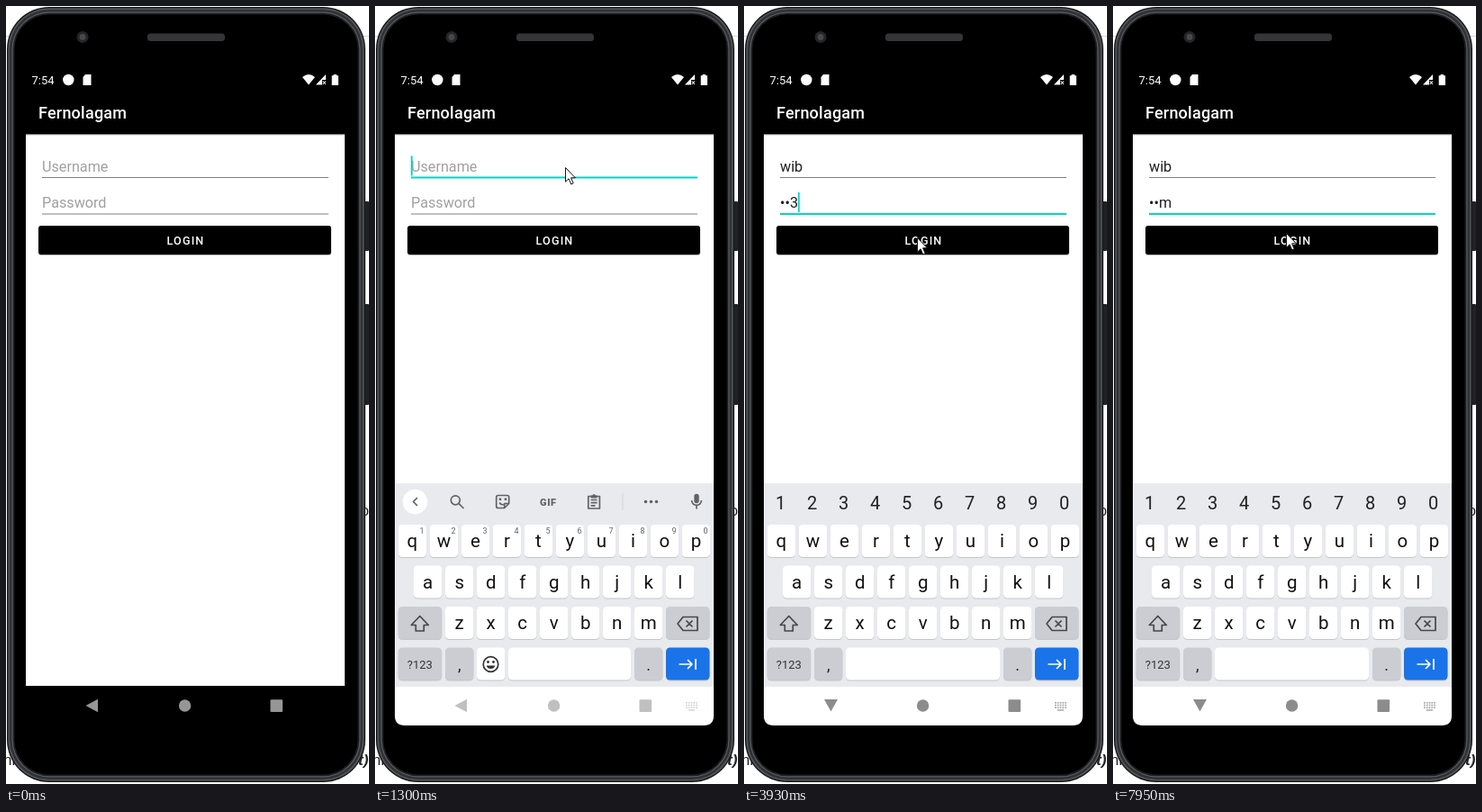
An HTML page for the animation above (8000 ms loop, 403 by 864 pixels).

```html
<!DOCTYPE html>
<html lang="en">
<head>
<meta charset="utf-8">
<title>Login screen</title>
<style>
html, body { margin: 0; width: 100%; height: 100%; overflow: hidden; background: #fff; }
svg { display: block; width: 100%; height: 100%; font-family: Roboto, sans-serif; }
.mid { text-anchor: middle; }
.field { font-size: 16.2px; white-space: pre; }
.line { fill: none; stroke: currentColor; stroke-width: 1.7; stroke-linejoin: round; }
.solid { fill: currentColor; }
</style>
</head>
<body>
<svg id="stage" viewBox="0 0 403 864"></svg>
<script>
const LOOP = 8000;
const TEAL = '#03d6c1';

const rect = (x, y, w, h, fill, r = 0, extra = '') =>
  `<rect x="${x}" y="${y}" width="${w}" height="${h}" rx="${r}" fill="${fill}" ${extra}/>`;
const circle = (x, y, r, fill, extra = '') =>
  `<circle cx="${x}" cy="${y}" r="${r}" fill="${fill}" ${extra}/>`;
const text = (x, y, size, str, fill = '#111', extra = '') =>
  `<text x="${x}" y="${y}" font-size="${size}" fill="${fill}" ${extra}>${str}</text>`;
const at = (x, y, body, color = '#5f6368') =>
  `<g transform="translate(${x} ${y})" color="${color}">${body}</g>`;
const line = d => `<path class="line" d="${d}"/>`;
const solid = d => `<path class="solid" d="${d}"/>`;

// Icons, drawn around 0,0
const icon = {
  search: line('M2.3 2.3L7.5 7.5M3.3 -1.7A5 5 0 1 1 -6.7 -1.7A5 5 0 1 1 3.3 -1.7Z'),
  sticker: line('M-5 -7H5Q7 -7 7 -5V2L2 7H-5Q-7 7 -7 5V-5Q-7 -7 -5 -7ZM2 7V2H7M-3.5 1Q-2 4 1 3') +
    solid('M-4 -4H-1.5V-1.5H-4ZM2 -4H4.5V-1.5H2Z'),
  gif: text(0, 4, 11, 'GIF', 'currentColor', 'class="mid" font-weight="900" letter-spacing=".6"'),
  clipboard: line('M-6.3 -6H6.3V7.5H-6.3ZM-3.5 -2H3.5M-3.5 1.2H3.5M-3.5 4.4H1.5') +
    solid('M-3.5 -7H-1.8A1.9 1.9 0 0 1 1.8 -7H3.5V-4H-3.5Z'),
  gear: circle(0, 0, 4.3, 'none', 'stroke="currentColor" stroke-width="4"') +
    circle(0, 0, 7, 'none', 'stroke="currentColor" stroke-width="2.4" stroke-dasharray="3.67 3.66"'),
  palette: solid('M0 -7.5A7.5 7.5 0 1 0 0 7.5Q2 7 1.3 5Q.8 3 3 3H4.5Q7.5 2.5 7.5 -.5Q7 -7 0 -7.5Z') +
    [[-4.4, -.5], [-2, -3.9], [2.2, -3.9], [4.7, -.7]].map(p => circle(...p, 1.3, '#f1f2f4')).join(''),
  resize: line('M7 0V-6.5H-7V6.5H0') + solid('M-3 -2.5L6 1L3.6 2.8L7.5 6.6L6 8L2.2 4.2L.3 6.5Z'),
  mic: solid('M-2.7 -6A2.7 2.7 0 0 1 2.7 -6V-1A2.7 2.7 0 0 1 -2.7 -1Z') +
    line('M-5.4 -1.5A5.4 5.4 0 0 0 5.4 -1.5M0 4V8'),
  dots: [-6, 0, 6].map(x => circle(x, 0, 1.8, 'currentColor')).join(''),
  chevron: line('M2.5 -4.5L-2 0L2.5 4.5'),
  shift: line('M0 -8.5L-9.5 1.5H-4.5V8H4.5V1.5H9.5Z'),
  erase: line('M-11 0L-5 -7.5H11V7.5H-5ZM-1.5 -3.5L5.5 3.5M5.5 -3.5L-1.5 3.5'),
  next: line('M-9.5 0H5M0 -5L5 0L0 5M9 -6V6'),
  smile: circle(0, 0, 8.3, 'none', 'stroke="currentColor" stroke-width="1.7"') +
    circle(-3, -2.5, 1.4, 'currentColor') + circle(3, -2.5, 1.4, 'currentColor') +
    solid('M-4.8 1.5H4.8A5 5 0 0 1 -4.8 1.5Z'),
  keyboard: [0, 1, 2].map(r => [0, 1, 2, 3, 4].map(c =>
    rect(-6.5 + c * 2.8, -4 + r * 2.7, 1.7, 1.6, 'currentColor')).join('')).join('') +
    rect(-3.5, 4.2, 7, 1.4, 'currentColor')
};

const key = (x, y, w, fill = '#fff', id = '') =>
  rect(x, y + 1, w, 36, '#c3c6cb', 4.5, id && `id="${id}Shade"`) +
  rect(x, y, w, 36, fill, 4.5, id && `id="${id}"`);
const letters = (row, x, y) => [...row].map((c, i) =>
  key(x + i * 35, y, 31.4) + text(x + 15.7 + i * 35, y + 25, 20.5, c, '#111', 'class="mid"')).join('');

function strip(names, color) {
  return names.map((n, i) => at(91 + i * 50.7, 550.5, icon[n], color)).join('') +
    circle(44.5, 550.5, 13.7, '#fff') + at(44.5, 550.5, icon.chevron) +
    rect(274.5, 541, 1, 19, '#d4d6da') +
    at(306.5, 550.5, icon.dots, color) + at(357, 550.5, icon.mic, color);
}

function keyboard() {
  const gray = '#cbcdd3';
  const digits = [...'1234567890'];
  return rect(22, 530, 354, 227, '#e8eaed', 0, 'id="keyBack"') +
    rect(22, 756, 354, 44, '#fff') +
    `<g id="stripStart">${strip(['clipboard', 'gear', 'palette', 'resize'], '#85898d')}</g>` +
    `<g id="stripReady">${strip(['search', 'sticker', 'gif', 'clipboard'], '#5f6368')}</g>` +
    `<g id="digits">${digits.map((d, i) => text(40.7 + i * 35, 559, 20, d, '#222', 'class="mid"')).join('')}</g>` +
    letters('qwertyuiop', 25.7, 576) +
    `<g id="hints">${digits.map((d, i) => text(52 + i * 35, 586, 9, d, '#5f6368', 'class="mid"')).join('')}</g>` +
    letters('asdfghjkl', 43, 621.5) +
    key(25.7, 667, 48.5, gray) + at(49.8, 686, icon.shift, '#44474b') +
    letters('zxcvbnm', 78, 667) +
    key(323, 667, 48.5, gray) + at(347, 686, icon.erase, '#44474b') +
    key(25.7, 712.5, 48.5, gray) + text(49.8, 736, 13, '?123', '#333', 'class="mid"') +
    key(78, 712.5, 31.4, gray) + text(93.7, 738, 18, ',', '#222', 'class="mid"') +
    `<g id="smile">${key(113, 712.5, 31.4)}${at(128.5, 731, icon.smile, '#333')}</g>` +
    key(148, 712.5, 136, '#fff', 'space') +
    key(288, 712.5, 31.4, gray) + text(303.5, 738, 18, '.', '#222', 'class="mid"') +
    key(323, 712.5, 48.5, '#1a73e8') + at(347, 731, icon.next, '#fff');
}

function page() {
  const serifless = 'font-family="Liberation Sans, sans-serif"';
  return rect(0, 0, 403, 864, '#fff') + rect(0, 33, 403, 1, '#d8d8d8') +
    text(-3, 843, 17, 'ni', '#222', serifless) +
    text(391, 843, 17, 't)', '#222', serifless + ' font-weight="700" font-style="italic"') +
    text(394, 566, 16, 'o', '#222', serifless);
}

function phone() {
  const shells = [[0, '#18191b'], [1.5, '#55575b'], [3, '#303134'], [5.5, '#5a5c60'], [6.7, '#1d1e20'], [8.5, '#000']];
  return rect(397, 217, 6, 55, '#202123', 1) + rect(397, 331, 6, 112, '#202123', 1) +
    shells.map(([d, c]) => rect(1 + d, 1 + d, 398 - 2 * d, 861 - 2 * d, c, 47 - d)).join('') +
    circle(85, 34.5, 6.5, '#242526') + circle(85, 34.5, 3.4, '#47484a') +
    rect(157, 30.5, 86, 8.5, '#343537', 3.5);
}

function statusBar() {
  return text(28.5, 87, 13, '7:54', '#fff') + circle(69.3, 82, 6.2, '#fff') +
    '<g fill="#fff"><path d="M88 76H94.5V88H85.5V79Z"/>' +
    '<path d="M329 79Q336 73 343 79L336 87.5Z"/><path d="M355 76V82L351 82V87.5H344Z"/>' +
    '<path d="M363.6 77.2V76H367V77.2H369V88H361.7V77.2Z"/></g>' +
    '<path d="M351.8 83.5L355 87M355 83.5L351.8 87" stroke="#fff" stroke-width="1.1"/>';
}

function app() {
  return rect(22, 143, 354, 612, '#fff') + rect(22, 142, 354, 1.2, '#777') +
    text(36, 125, 18.03, 'Fernolagam', '#fff', 'font-weight="500" letter-spacing=".22"') +
    '<text id="user" class="field" x="40" y="183.6"/><text id="pass" class="field" x="40" y="224"/>' +
    rect(40, 190, 318, 1, '#808080', 0, 'id="userLine"') +
    rect(40, 230.5, 318, 1, '#808080', 0, 'id="passLine"') +
    rect(40, 166.5, 1.8, 22, TEAL, 0, 'id="caret"') +
    rect(36, 245, 325, 32, '#b5b5b5', 3) + rect(36, 244, 325, 32, '#000', 3) +
    `<g clip-path="url(#buttonClip)">${circle(193, 258, 0, '#fff', 'id="ripple"')}</g>` +
    text(199.5, 265, 12.6, 'LOGIN', '#fff', 'class="mid" font-weight="500" letter-spacing="1.13"');
}

const nav = '<path id="back"/>' + '<circle cx="198.6" cy="777" r="6.7"/>' +
  '<rect x="293.5" y="770.3" width="13.6" height="13.6" rx="1"/>';

document.getElementById('stage').innerHTML =
  `<defs><clipPath id="screen"><path d="M22 143H376V788Q376 799 365 799H33Q22 799 22 788Z"/></clipPath>
  <clipPath id="buttonClip">${rect(36, 244, 325, 32, '#000', 3)}</clipPath></defs>` +
  page() + phone() + statusBar() + app() +
  `<g clip-path="url(#screen)"><g id="keys">${keyboard()}</g>${rect(22, 755, 354, 45, '#000', 0, 'id="navShade"')}</g>` +
  `<g id="nav">${nav}</g><g id="navKeys">${at(351.5, 777, icon.keyboard, 'inherit')}</g>` +
  '<path id="pointer" fill="#fff" stroke="#111" stroke-width="1" stroke-linejoin="round" ' +
  'd="M.5 .5V16.2L4.1 12.8L6.7 18.9L9.2 17.8L6.6 11.8H11.4Z"/>';

const el = {};
document.querySelectorAll('[id]').forEach(n => el[n.id] = n);
const set = (id, attrs) => { for (const k in attrs) el[id].setAttribute(k, attrs[k]); };
const show = (id, on) => set(id, { visibility: on ? 'visible' : 'hidden' });
const latest = (list, t) => list.reduce((v, [start, x]) => t >= start ? x : v, list[0][1]);

const userTyping = [[0, ''], [1530, 'w'], [1600, 'wi'], [1680, 'wib']];
const passTyping = [[0, ''], [2380, '1'], [2460, '•2'], [2540, '••3'], [4080, '•••'],
  [6400, '••'], [6570, '•'], [6720, ''], [6950, 't'], [7030, '•i'], [7180, '••m']];

// start, end, steps, target
const moves = [[70, 590, 8, 211, 179], [2920, 3380, 7, 192, 257], [4010, 4160, 3, 175, 221],
  [4480, 4560, 2, 140, 210], [5090, 5250, 3, 169.5, 255], [5400, 5560, 3, 140, 210],
  [7640, 7950, 5, 192, 252]];

function pointerAt(t) {
  let x = 378, y = 801;
  moves.forEach(([a, b, n, tx, ty], i) => {
    if (t < a) return;
    const k = Math.min(n - 1, Math.floor((t - a + 1) / (b - a) * (n - 1)));
    const p = i ? (k + 1) / n : k / (n - 1);
    const e = p * p * (3 - 2 * p);
    x += (tx - x) * e;
    y += (ty - y) * e;
  });
  return [x, y];
}

function caretOn(t) {
  if (t < 760) return false;
  if (t < 2520) return true;
  const since = t >= 7180 ? t - 7180 : t >= 6400 ? 0 : t - 2520;
  return since % 1000 < 500;
}

function field(id, value, hint) {
  el[id].textContent = value || hint;
  set(id, { fill: value ? '#1f1f1f' : '#a0a0a0' });
  return value ? el[id].getComputedTextLength() : 0;
}

function underline(id, y, focused) {
  set(id, { y: focused ? y - .5 : y, height: focused ? 2 : 1, fill: focused ? TEAL : '#808080' });
}

function draw(t) {
  const onUser = t >= 760 && t < 1850, onPass = t >= 1850;
  const userWidth = field('user', latest(userTyping, t), 'Username');
  const passWidth = field('pass', latest(passTyping, t), 'Password');
  underline('userLine', 190, onUser);
  underline('passLine', 230.5, onPass);
  set('caret', { x: 39.9 + (onPass ? passWidth : userWidth), y: onPass ? 207 : 166.5 });
  show('caret', caretOn(t));

  const press = (t - 3620) / 310;
  const pressed = press >= 0 && press < 1;
  set('ripple', { r: pressed ? 30 + 330 * press : 0, opacity: pressed ? .24 * (1 - press) : 0 });

  const opened = t >= 1140, ready = t >= 1300, secret = t >= 1930;
  show('keys', opened);
  set('keys', { transform: `translate(0 ${latest([[0, 85.5], [1210, 25], [1300, 0]], t)})` });
  set('keyBack', { fill: ready ? '#e8eaed' : '#f1f2f4' });
  el.stripStart.style.display = ready ? 'none' : '';
  el.stripReady.style.display = ready && !secret ? '' : 'none';
  el.digits.style.display = secret ? '' : 'none';
  el.hints.style.display = el.smile.style.display = secret ? 'none' : '';
  for (const id of ['space', 'spaceShade']) set(id, secret ? { x: 113, width: 171 } : { x: 148, width: 136 });

  set('navShade', { opacity: latest([[0, 0], [1140, .33], [1210, .12], [1300, 0]], t) });
  const navColor = latest([[0, '#969696'], [990, '#b8b8b8'], [1300, '#c0c0c0'], [1370, '#8c8c8c']], t);
  set('nav', { fill: navColor });
  set('back', { d: t < 1370 ? 'M102 769.8V784.2L88.5 777Z' : 'M89 770H104L96.5 783.5Z' });
  show('navKeys', t >= 1210);
  el.navKeys.firstChild.setAttribute('color', t < 1370 ? '#d0d0d0' : '#a0a0a0');

  show('pointer', t >= 70);
  set('pointer', { transform: `translate(${pointerAt(t).map(Math.round).join(' ')})` });
}

const begin = performance.now();
function frame() {
  draw((performance.now() - begin) % LOOP);
  requestAnimationFrame(frame);
}
draw(0);
requestAnimationFrame(frame);
</script>
</body>
</html>
```
